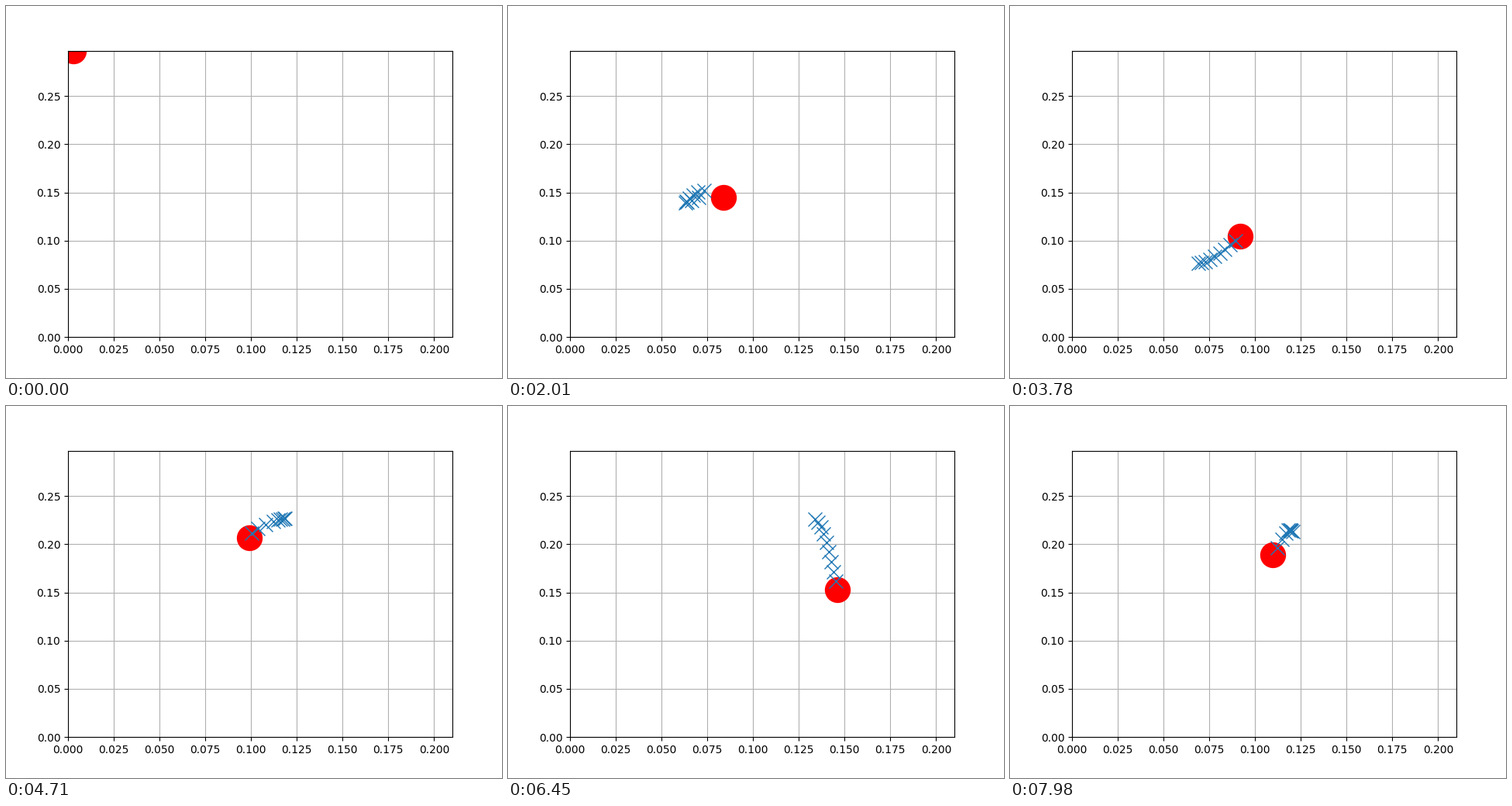
A matplotlib script for the animation above (8000 ms loop, 640 by 480 pixels).

```python
import numpy as np
import matplotlib.pyplot as plt
from matplotlib.animation import FuncAnimation

W, H = 640, 480
PLATE_W, PLATE_H = 0.21, 0.297      # plate size in metres
LOOP, TICK, STEP = 8000, 20, 30     # ms
SAMPLES = 267
TRAIL = 9

START = (87, 58)                    # reading before the ball is placed

# turning points of the ball: step, x, y in stage pixels
TURNS = np.array([
    (1, 262, 247), (18, 280, 240), (27, 297, 219), (41, 429, 218),
    (54, 290, 233), (61, 229, 254), (66, 253, 238), (67, 278, 247),
    (82, 507, 138), (87, 487, 123), (93, 397, 138), (96, 328, 171),
    (108, 220, 299), (117, 243, 332), (126, 297, 297), (135, 352, 200),
    (148, 360, 145), (152, 351, 147), (157, 314, 170), (176, 400, 294),
    (184, 437, 262), (202, 381, 137), (207, 400, 150), (215, 425, 237),
    (227, 440, 340), (244, 437, 280), (257, 365, 162), (262, 359, 160),
    (266, 339, 192),
], float)


def smooth(t, knots, values):
    """Monotone cubic interpolation: no overshoot at the turning points."""
    h = np.diff(knots)
    d = np.diff(values) / h
    a, b = d[:-1], d[1:]
    same = a * b > 0
    inner = np.where(same, 2 * a * b / np.where(same, a + b, 1), 0)
    m = np.concatenate([d[:1], inner, d[-1:]])
    i = np.clip(np.searchsorted(knots, t, side="right") - 1, 0, len(d) - 1)
    u = (t - knots[i]) / h[i]
    return (values[i] * (1 + 2 * u) * (1 - u) ** 2
            + values[i + 1] * u * u * (3 - 2 * u)
            + h[i] * u * (1 - u) * (m[i] * (1 - u) - m[i + 1] * u))


fig, ax = plt.subplots(figsize=(W / 100, H / 100), dpi=100)
ax.set_xlim(0, PLATE_W)
ax.set_ylim(0, PLATE_H)
ax.grid(True)

steps = np.arange(1, SAMPLES)
knots, turn_x, turn_y = TURNS.T
px = np.append(START[0], smooth(steps, knots, turn_x))
py = np.append(START[1], smooth(steps, knots, turn_y))

# stage pixels to plate coordinates
box = ax.get_position()
xs = (px / W - box.x0) / box.width * PLATE_W
ys = (1 - py / H - box.y0) / box.height * PLATE_H

ball, = ax.plot([], [], "o", color="red", markersize=23)
trail, = ax.plot([], [], "x", color="C0", markersize=12.5)


def draw(i):
    k = min((i * TICK + TICK // 2) // STEP, SAMPLES - 1)
    past = slice(max(0, k - TRAIL), k)
    ball.set_data([xs[k]], [ys[k]])
    trail.set_data(xs[past], ys[past])
    return ball, trail


ani = FuncAnimation(fig, draw, frames=LOOP // TICK, interval=TICK,
                    init_func=lambda: draw(0), repeat=True, repeat_delay=0)
plt.show()
```
